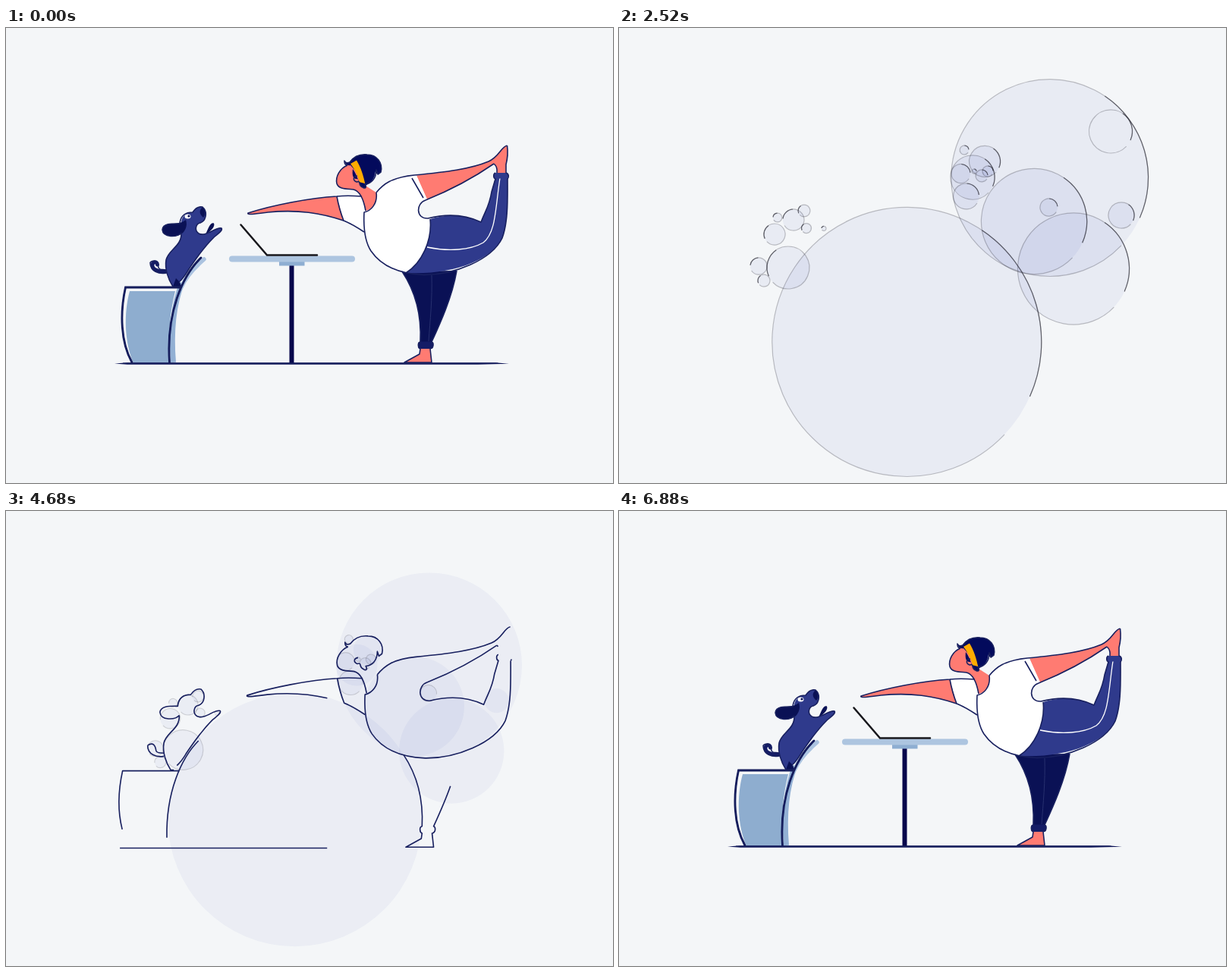
These frames come from a looping animation (800 px wide and 600 px high, 7920 ms). An HTML page:

```html
<!DOCTYPE html>
<html lang="en">
<head>
<meta charset="utf-8">
<title>Yoga with dog</title>
<style>
  html, body { margin: 0; width: 100%; height: 100%; overflow: hidden; background: #f4f6f8; }
  svg { display: block; width: 100vw; height: 100vh; }
  .line { fill: none; stroke: #18205f; stroke-width: 1.6; stroke-linejoin: round; }
  .ring { fill: none; stroke: #22222c; stroke-width: 1.1; }
  .disc { fill: #1e329b; }
  .skin { fill: #ff7b72; }
  .navy { fill: #0a1155; }
  .blue { fill: #2f3a8c; }
  .hair { fill: #030a5c; }
  .thick { fill: none; stroke-linecap: round; }
</style>
</head>
<body>
<svg viewBox="0 0 800 600">
  <g id="circles"></g>

  <g id="art">
    <!-- chair -->
    <path fill="#8eadcf" d="M163 347H223C215 378 214 410 216 442H168C156 414 155 376 163 347Z"/>
    <path fill="none" stroke="#92b0d4" stroke-width="7" d="M232 336C221 364 217 398 220.5 441"/>
    <path class="thick" stroke="#abc3e0" stroke-width="5.5" d="M261 305C248 316 237 328 231 342"/>
    <path class="thick" stroke="#0d1556" stroke-width="2.8" d="M231 342H157.5C150 376 151 414 166 441M257 303C232 327 211 376 215.5 441"/>
    <!-- table and laptop -->
    <rect x="373.5" y="313" width="6" height="129" fill="#06064c"/>
    <rect x="360" y="307" width="33.5" height="6.5" fill="#8eaed2"/>
    <rect x="294" y="300.5" width="166" height="8" rx="4" fill="#adc5e0"/>
    <path class="thick" d="M309.5 259.5L344 299.5H410" stroke="#17171c" stroke-width="2.5"/>
    <path class="navy" d="M143 442.5L160 441.2H645L663 442.8L622 443.8H160Z"/>
    <!-- standing leg -->
    <path class="skin" d="M546 423L545 430L525 441H561L559 423Z"/>
    <path class="navy" d="M522 321C538 345 548 375 546 414H561C572 390 588 355 594 320Z"/>
    <path fill="none" stroke="#27306f" d="M561 326C562 356 559 386 557 413"/>
    <rect x="543" y="413.5" width="20" height="9.5" rx="3" fill="#141c66"/>
    <!-- raised leg -->
    <path class="blue" d="M559 252C580 245 605 246 626 256C632 240 637 235 640 216L645 198H661C661 225 662 255 654 277C640 306 590 326 527 323C548 310 562 280 559 252Z"/>
    <path fill="none" stroke="#fff" stroke-width="1.3" d="M555 289C583 295 612 293 629 283C646 270 645 236 651 198"/>
    <!-- torso and arms -->
    <path class="skin" d="M541 194.500C580 190 612 186 636 176C650 170 653 156 660.500 155C662 166 661 172 659 180V191H647Q648 183 643 179C620 195 590 212 555 226Z"/>
    <rect class="blue" x="643" y="191" width="19" height="7.5" rx="3"/>
    <path class="skin" d="M436 222C400 224 350 234 319 244C317 247 330 245 345 243C385 239 415 244 445 254Z"/>
    <path fill="#fff" d="M436 222H469L474 242L472 269L445 254Z"/>
    <path fill="#fff" d="M488 217C497 206 508 197 541 194.5L555 226C540 231 540 252 556 251L559 252C562 280 548 310 527 323C505 318 490 308 481 294C472 280 471 262 472 243C481 241 490 232 488 217Z"/>
    <path class="line" d="M559 252C562 280 548 310 527 323M535 198L550 224"/>
    <!-- head -->
    <path class="skin" d="M450 181C440 185 434 196 436 205C438 213 450 212 458 213C466 215 471 224 474 241C484 239 489 229 488 217L474 208L457 180Z"/>
    <path class="hair" d="M446 175C448 179 451 178 453 177C458 170 465 166 476 167C489 167 497 178 494 190L490 193L487 189C486 199 481 205 473 208L462 190L454 181C450 182 447 180 446 175Z"/>
    <path fill="#ffab00" d="M454 179L462 174.5C468 184 471 195 473.5 206L467 208C465 196 460 187 454 179Z"/>
    <path class="hair" d="M457 186C460 190 463 196 465 203L473 205C476 209 475 211 472 211C464 209 467 199 462 199C457 199 456 193 457 186Z"/>
    <!-- dog -->
    <path class="thick" stroke="#141c66" stroke-width="5" d="M213 321C204 322 194 320 193 314C192 308 199 307 199.5 312"/>
    <path class="navy" d="M263 272C267 264 269 256 274 257.5C276 262 270 268 263 272Z"/>
    <path class="blue" d="M231 270C229 257 231 243 246 243C250 237 254 235 259 236C266 242 264 254 256 257C250 258 248 267 254 271C264 276 276 262 284 264C286 267 280 271 274 276C258 292 250 305 241 318C236 326 234 330 228 335L231 341H220C214 332 209 318 211 306C214 292 232 288 231 270Z"/>
    <path class="navy" d="M237 253C226 262 208 254 206 266C207 277 226 276 232 271C238 266 239 258 237 253ZM259 236C264 241 263 247 260 250C256 246 253 242 259 236ZM224 330L220 341H231L228 334Z"/>
    <ellipse cx="239.5" cy="248.5" rx="4" ry="3" fill="#fff"/>
    <circle class="navy" cx="241" cy="248" r="1.6"/>
  </g>

  <!-- outlines, in the waves in which they are drawn -->
  <g id="lines" class="line">
    <g data-from="2980" data-to="3760">
      <path d="M450 181C447 181 446 178 446 175C448 179 451 178 453 177C458 170 465 166 476 167C489 167 497 178 494 190L490 193L488 187C488 198 482 205 473 206C476 211 473 212 470 210C463 207 469 201 462 203C457 201 457 196 463 195"/>
      <path d="M450 181C440 185 434 196 436 205C438 213 450 212 458 213C466 215 471 224 474 241"/>
      <path d="M488 217C497 206 508 197 538 194C580 190 612 186 636 176C650 170 653 156 660.5 155"/>
    </g>
    <g data-from="3000" data-to="4450">
      <path d="M488 217C490 232 481 241 472 243C471 262 472 280 481 294C492 310 512 324 550 325.5C590 326 640 306 654 277C662 255 661 225 661 199"/>
      <path d="M643 179C620 195 590 212 553 227C540 231 540 252 556 251C580 245 605 246 626 256C632 240 637 235 640 216L645 199C642 198 642 192 645 191"/>
      <path d="M472 269C463 263 455 258 445 254C441 244 438 233 436 222"/>
      <path d="M231 270C226 276 207 277 206 266C207 257 220 258 229 258C230 248 236 243 246 243C250 237 254 235 259 236C266 242 264 254 256 257C250 258 248 267 254 271C264 276 276 262 284 264C286 267 280 271 274 276C258 292 250 305 241 318C236 326 234 330 228 335"/>
    </g>
    <g data-from="3100" data-to="4820">
      <path d="M469 222C455 221 445 221 436 222C400 224 350 234 319 244C317 247 330 245 345 243C385 239 415 244 445 254"/>
      <path d="M256 303C232 327 211 376 215.5 441"/>
    </g>
    <g data-from="3650" data-to="4850">
      <path d="M522 321C538 345 548 375 546 414C542 415 543 422 546 423L545 430L525 441H561L559 423C564 422 564 415 561 414C572 390 588 355 594 320"/>
      <path d="M231 342H157.5C150 376 151 414 166 441"/>
      <path d="M231 270C232 288 214 292 211 306C209 318 214 332 220 341H231L228 335"/>
    </g>
    <g data-from="4120" data-to="5150">
      <path d="M154 442.3H648.5"/>
      <path d="M190 309C197 304 200 309 201 316C203 320 206 318 211 319M211 323C202 325 190 321 190 309"/>
    </g>
    <g data-from="4660" data-to="5200">
      <path d="M661 199C663 197 663 192 659 191V180C661 172 662 166 660.5 155M643 179Q648 183 647 191"/>
    </g>
  </g>
</svg>
<script>
const NS = 'http://www.w3.org/2000/svg';
const LOOP = 7920, STEP = 40;
const CLEAR = 1240;
const circleLayer = document.getElementById('circles');
const artLayer = document.getElementById('art');
const lineLayer = document.getElementById('lines');
const waves = [...lineLayer.children];
lineLayer.querySelectorAll('path').forEach(p => p.setAttribute('pathLength', 1));

function add(parent, tag, attrs) {
  const el = document.createElementNS(NS, tag);
  for (const name in attrs) el.setAttribute(name, attrs[name]);
  return parent.appendChild(el);
}

const ramp = (t, from, to) => Math.min(1, Math.max(0, (t - from) / (to - from)));
const ease = (t, from, to) => (1 - Math.cos(Math.PI * ramp(t, from, to))) / 2;

// Construction circles as x, y, radius; the dog's are traced anticlockwise.
const groups = [
  { dir: 1, late: 0, circles: [
    [380.8, 405.5, 164.4], [555.3, 205.1, 120.3], [536.2, 258.3, 64.5], [584.3, 316.2, 68.1],
    [629.7, 148.5, 26.4], [642.7, 250.9, 15.8], [461.1, 204.6, 27], [476, 185.1, 19]] },
  { dir: 1, late: 1, circles: [
    [554.2, 241.2, 10.7], [446.8, 200, 11.6], [453.3, 227.7, 15.7], [451, 171.2, 5.5],
    [472.3, 202.7, 7.4], [479.7, 197.2, 6.5], [463, 197.2, 2.8]] },
  { dir: -1, late: 0, circles: [
    [236, 314.8, 25.9], [255.5, 245.3, 7.3], [219.4, 274.1, 13], [258.3, 266.7, 6], [206.4, 330.6, 7.4]] },
  { dir: -1, late: 1, circles: [
    [242.5, 256.5, 13], [223, 253.7, 5.5], [279.6, 267, 2.8], [200, 313, 10.3]] }
];

const discLayer = add(circleLayer, 'g', { class: 'disc' });
for (const g of groups) {
  g.rings = g.circles.map(([x, y, r]) => {
    add(discLayer, 'circle', { cx: x, cy: y, r });
    return {
      x, y, r, dir: g.dir,
      pale: add(circleLayer, 'path', { class: 'ring' }),
      dark: add(circleLayer, 'path', { class: 'ring' })
    };
  });
}
// The circle over the foot stays hollow.
discLayer.children[4].remove();

// Arc between two angles in degrees, measured from the top.
function arc(c, a0, a1) {
  const at = a => {
    const rad = a * Math.PI / 180;
    return `${c.x + c.dir * c.r * Math.sin(rad)} ${c.y - c.r * Math.cos(rad)}`;
  };
  const large = a1 - a0 > 180 ? 1 : 0, sweep = c.dir > 0 ? 1 : 0;
  return a1 > a0 ? `M${at(a0)}A${c.r} ${c.r} 0 ${large} ${sweep} ${at(a1)}` : '';
}

function drawCircles(t) {
  discLayer.setAttribute('fill-opacity', .105 * ease(t, 1400, 3600) * (1 - ramp(t, 3800, 5250)));
  const ink = .27 + .28 * ramp(t, 2520, 3300);
  const dark = .6 * ramp(t, 1400, 1900) * (1 - ramp(t, 2520, 3300));
  for (const g of groups) {
    const u = t - 220 * g.late;
    const head = 11.5 + 462.5 * ease(u, 1190, 2520) - 17 * ramp(u, 2520, 3760);
    const tail = 11.5 + 122 * ease(u, 1400, 2520);
    const fadeEnd = g.late || g.dir < 0 ? 5050 : 4680;
    const pale = ink * (1 - ramp(t, 3800, fadeEnd));
    for (const c of g.rings) {
      c.pale.setAttribute('d', arc(c, tail, head));
      c.pale.setAttribute('stroke-opacity', pale);
      c.dark.setAttribute('d', arc(c, Math.max(tail, head - 80), head));
      c.dark.setAttribute('stroke-opacity', dark);
    }
  }
}

function zoom(el, s) {
  el.setAttribute('transform', `translate(400 300) scale(${s}) translate(-400 -300)`);
}

function drawLines(t, leaving) {
  for (const wave of waves) {
    const p = leaving ? 1 : ramp(t, +wave.dataset.from, +wave.dataset.to);
    wave.style.display = p > 0 ? '' : 'none';
    wave.setAttribute('stroke-dasharray', p < 1 ? `${p} 2` : 'none');
  }
}

function render(t) {
  const leaving = t < CLEAR;
  const fadeOut = 1 - ramp(t, 520, CLEAR);
  const scale = 1 + .11 * (1 - ease(t, 620, 6020));

  zoom(circleLayer, scale);
  zoom(lineLayer, leaving ? 1 : scale);
  zoom(artLayer, leaving ? 1 : scale);

  drawCircles(t);
  drawLines(t, leaving);
  lineLayer.setAttribute('opacity', leaving ? fadeOut : 1);
  artLayer.setAttribute('opacity', leaving ? fadeOut : ramp(t, 5360, 6800));
}

const start = performance.now();
function frame() {
  const t = (performance.now() - start) % LOOP;
  render(Math.floor(t / STEP) * STEP);
  requestAnimationFrame(frame);
}
frame();
</script>
</body>
</html>
```
